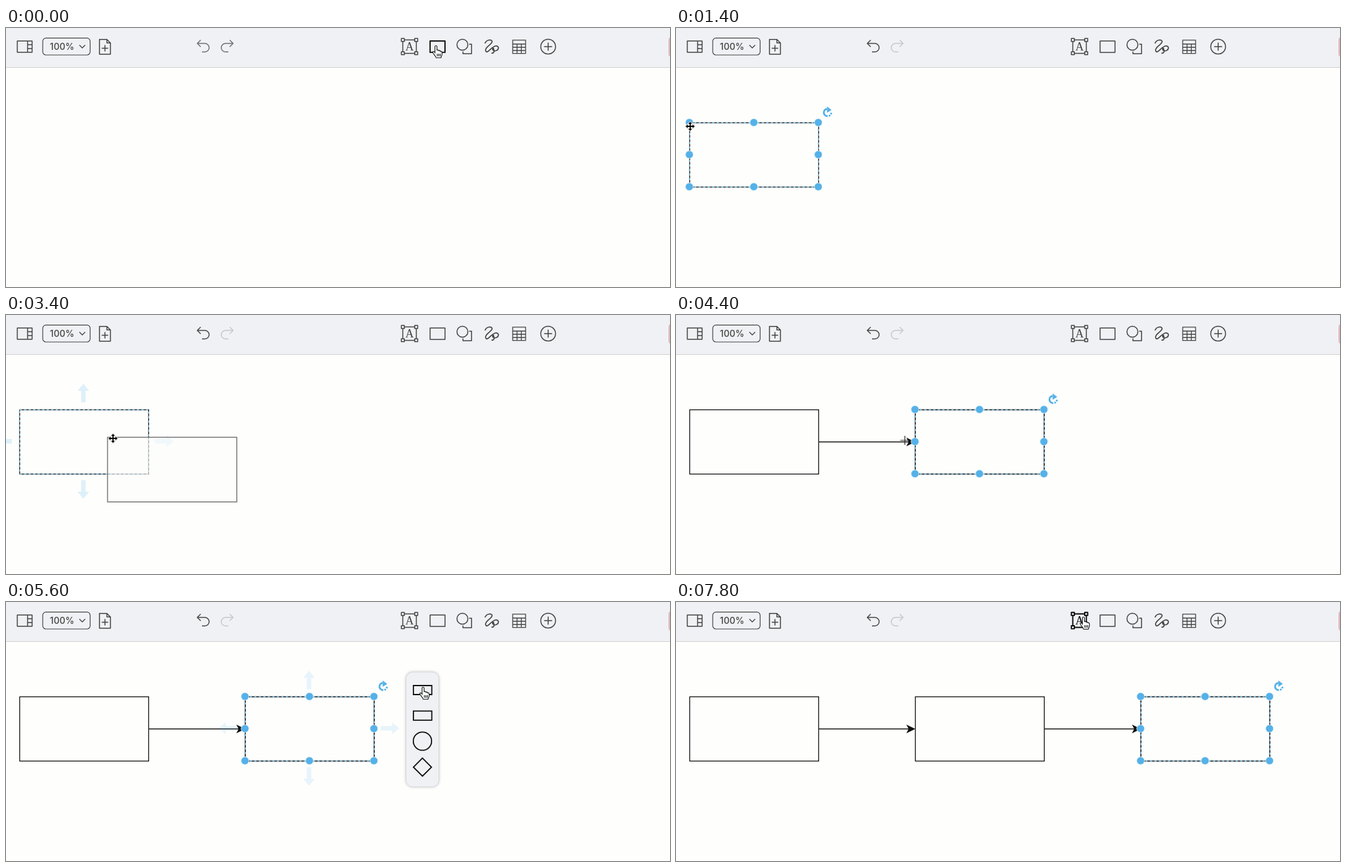
Recreate the animation shown at these times as an HTML page. Size 1030x403 px, loop 8 s.

```html
<!DOCTYPE html>
<html lang="en">
<head>
<meta charset="utf-8">
<title>Connecting shapes</title>
<style>
  html, body { margin: 0; width: 100%; height: 100%; overflow: hidden; background: #fefefc; }
  svg { display: block; width: 1030px; height: 403px; }
  .icon { fill: none; stroke: #444; stroke-width: 1.5; stroke-linejoin: round; }
  .icon text { fill: #444; stroke: none; text-anchor: middle; }
  .icon.hover { stroke: #0a0a0a; stroke-width: 1.9; }
  .icon.hover text { fill: #0a0a0a; }
  .line { fill: none; stroke: #111; stroke-width: 1.3; }
  .zoom { font: 500 14px Inter, sans-serif; }
  .letter { font: 18px "Liberation Serif", serif; }
</style>
</head>
<body>
<svg viewBox="0 0 1030 403">
  <rect width="1030" height="61" fill="#f0f1f4"/>
  <path d="M0 61.5H1030" stroke="#d0d0d2"/>
  <rect x="1028.5" y="13.5" width="40" height="32" rx="5" fill="#f6d5d7" stroke="#c9979c"/>

  <g class="icon">
    <path d="M17.5 20.2H40.5V37.8H17.5ZM33.5 20V38M33.5 26H40.5M33.5 32H40.5"/>
    <rect x="57" y="15.7" width="73.5" height="26.3" rx="5" stroke-width="1.2"/>
    <text class="zoom" x="87" y="34">100%</text>
    <path d="M113.8 26.5L118.3 31L122.8 26.5" stroke-width="1.3"/>
    <path d="M145 17.8H156.5L162 23.3V40.8H145ZM156.5 18V23.3H162M153.5 26.5V36.5M148.5 31.5H158.5"/>
  </g>
  <path id="undo" class="icon" d="M302 18.7L296.7 24L302 29.3M297 24H308.5A6.6 6.6 0 0 1 308.5 37.2H304"/>
  <path id="redo" class="icon" d="M347 18.7L352.3 24L347 29.3M352 24H340.5A6.6 6.6 0 0 0 340.5 37.2H345"/>
  <g id="textTool" class="icon">
    <path d="M618 18.5H634M618 39.5H634M615.5 21V37M636.5 21V37"/>
    <path d="M613.3 16.3h4.6v4.6h-4.6zM634 16.3h4.6v4.6h-4.6zM613.3 37h4.6v4.6h-4.6zM634 37h4.6v4.6h-4.6z"/>
    <text class="letter" x="626" y="35">A</text>
  </g>
  <rect id="boxTool" class="icon" x="657.8" y="20.3" width="23.2" height="17.6"/>
  <g class="icon">
    <circle cx="708" cy="26" r="8.5"/>
    <path d="M718.5 25.3H722.2V40H708.8V36.5"/>
    <path d="M743 24C745 18 754 17 754 21C754 26 743 29 744 35C746 42 752 30 759 28C765 27 765 33 761 35C756 37 753 33 756 31M756 31C758 37 757 40 753 39" stroke-width="1.7"/>
    <path d="M786 18.8H806V39.7H786ZM786 25H806M786 30H806M786 35H806M792.7 25V39.5M799.4 25V39.5" stroke-width="1.3"/>
    <path d="M829.5 29a11.5 11.5 0 1 0 23 0a11.5 11.5 0 1 0-23 0M841 22.8V35.2M834.8 29H847.2"/>
  </g>

  <g id="boxes"></g>
  <g id="arrows" fill="#29a4f2"></g>
  <g id="selection">
    <rect class="line" width="200" height="100"/>
    <rect width="200" height="100" fill="none" stroke="#7cc8ee" stroke-width="1.4" stroke-dasharray="3 4"/>
    <g id="handles" fill="#55b1e8" stroke="#dff1fa" stroke-width=".8">
      <g transform="translate(214 -16)" fill="none" stroke="#55b1e8" stroke-width="2.8">
        <path d="M-1-5.5A5.5 5.5 0 0 0 0 5.5"/>
        <path d="M0 5.5A5.5 5.5 0 0 0 5.5-1" stroke-dasharray="0 1.8 2.4 1.6 2.4 1.6"/>
        <path d="M-1-9.5L6-4L-1 .5Z" fill="#55b1e8" stroke="none"/>
      </g>
    </g>
  </g>
  <rect id="ghost" width="200.5" height="100.5" fill="#fefefc" fill-opacity=".6" stroke="#777" stroke-width="1.5"/>

  <g id="popup">
    <rect x="620.5" y="109" width="51" height="178.5" rx="10" fill="#f0f1f4" stroke="#d6d6da" style="filter:drop-shadow(0 0 2px #0003)"/>
    <path class="line" style="stroke-width:1.8" d="M632 130H660.5V144H632ZM632 169.7H660.5V183.8H632ZM631.8 216.5a14.2 14.2 0 1 0 28.4 0a14.2 14.2 0 1 0-28.4 0M646 242.8L660 257L646 271L632 257Z"/>
  </g>

  <g id="cursor">
    <path id="arrow" d="M0 0V14.5L3.3 11.4L5.6 16.6L8 15.6L5.8 10.5H10.2Z" fill="#000" stroke="#fff"/>
    <path id="hand" d="M-1.6 1C-1.6-1 1.5-1 1.5 1V7C1.6 5.6 4.2 5.7 4.2 7.3V8C4.4 6.7 6.9 6.8 6.9 8.4V9C7.1 8 9.3 8 9.3 10V13C9.3 15.5 7.8 16 7.8 18.3H.2C0 15.8-4.8 12-5 9.7C-5 8-2.9 8-1.6 10.3ZM2 12V16M4.3 12V16M6.6 12V16" fill="#fff" stroke="#111" stroke-width="1.1"/>
    <g id="move">
      <path d="M0-8L8 0L0 8L-8 0Z" fill="#fff" stroke="#bbb" stroke-width=".6"/>
      <path d="M-5 0H5M0-5V5" stroke="#000" stroke-width="1.8"/>
      <path d="M0-7L3-3.7H-3ZM0 7L3 3.7H-3ZM-7 0L-3.7-3V3ZM7 0L3.7-3V3Z"/>
    </g>
    <path id="cross" d="M-7 0H7M0-7V7" stroke="#222" stroke-width="1.2"/>
  </g>
</svg>
<script>
const $ = id => document.getElementById(id);
const show = (el, on) => el.style.display = on ? '' : 'none';
const place = (el, x, y) => el.setAttribute('transform', `translate(${x} ${y})`);
const STEP = 200, LOOP = 8000, GAP = 350, LEFT = 21.3, TOP = 147.5;
const boxX = i => LEFT + GAP * i;

// Each box after the first carries the connector leading to it.
$('boxes').innerHTML = [0, 1, 2].map(i => `<g transform="translate(${boxX(i)} ${TOP})">
  <rect class="line" width="200" height="100"/>
  ${i ? '<path class="line" d="M-150 50H-10"/><path d="M0 50L-14 43.3L-10.5 50L-14 56.7Z" fill="#111"/>' : ''}</g>`).join('');
const boxes = [...$('boxes').children];

// Block arrows around a box: right, down, left, up.
$('arrows').innerHTML = [111, 60.5, 111, 60.5].map((d, i) =>
  `<path transform="rotate(${i * 90}) translate(${d})" d="M0-3.5H18V-9L29 0L18 9V3.5H0Z"/>`).join('');
const arrowRight = $('arrows').firstChild;

for (const x of [0, 100, 200])
  for (const y of [0, 50, 100])
    if (x !== 100 || y !== 50)
      $('handles').insertAdjacentHTML('beforeend', `<circle cx="${x - .6}" cy="${y - .5}" r="6"/>`);

// Pointer path: step, x, y, pointer shape from there on.
const path = [
  [0, 667, 28, 'hand'], [1, 667, 28, 'hand'], [2, 590, 48, 'arrow'], [3, 250, 106, 'arrow'],
  [4, 49, 136, 'arrow'], [6, 20, 153, 'arrow'], [7, 22, 153, 'move'], [9, 70, 160, 'move'],
  [10, 300, 120, 'arrow'], [12, 664, 31, 'hand'], [13, 673, 25, 'hand'], [14, 670, 26, 'hand'],
  [15, 560, 64, 'arrow'], [17, 166, 192, 'move'], [19, 242, 197, 'move'], [21, 260, 197, 'arrow'],
  [22, 355, 195, 'cross'], [23, 410, 195, 'move'], [25, 555, 197, 'move'], [26, 596, 197, 'hand'],
  [28, 647, 133, 'hand'], [33, 647, 133, 'arrow'], [38, 632, 26, 'hand'], [39, 632, 24, 'hand']
];

function pointer(n) {
  const i = path.findLastIndex(k => k[0] <= n);
  const [t, x, y, kind] = path[i], next = path[i + 1] || path[i];
  const f = next[0] > t ? (n - t) / (next[0] - t) : 0;
  return { x: x + (next[1] - x) * f, y: y + (next[2] - y) * f, kind };
}

function draw(n) {
  const within = (a, b) => n >= a && n <= b;
  const p = pointer(n);
  place($('cursor'), p.x, p.y);
  for (const kind of ['arrow', 'hand', 'move', 'cross']) show($(kind), kind === p.kind);

  const count = [7, 21, 31].filter(s => n >= s).length;
  const current = count - 1;
  boxes.forEach((b, i) => show(b, i < count && i !== current || i === current && i > 0));
  show($('selection'), count > 0);
  place($('selection'), boxX(current), TOP);

  const dragging = within(2, 6) || within(15, 20), docked = within(19, 20);
  show($('handles'), !within(15, 20));
  show($('ghost'), dragging);
  if (docked) place($('ghost'), boxX(1), TOP);
  else place($('ghost'), p.x + (n < 7 ? 6.2 : -8.5), p.y - (n < 7 ? 3.5 : 1.7));

  show($('arrows'), within(16, 20) || within(24, 30));
  place($('arrows'), boxX(current) + 98.7, 196.5);
  $('arrows').setAttribute('fill-opacity', n < 21 ? .15 : .11);
  arrowRight.setAttribute('fill-opacity', docked || n === 26 ? .8 : n < 21 ? .15 : .11);
  show($('popup'), within(27, 30));

  $('boxTool').classList.toggle('hover', n < 2 || within(12, 14));
  $('textTool').classList.toggle('hover', n >= 38);
  $('undo').style.stroke = count ? '#484848' : '#707072';
  $('redo').style.stroke = count ? '#c8c8cb' : '#707072';
}

function tick(now) {
  draw(Math.floor(now % LOOP / STEP));
  requestAnimationFrame(tick);
}
draw(0);
requestAnimationFrame(tick);
</script>
</body>
</html>
```
